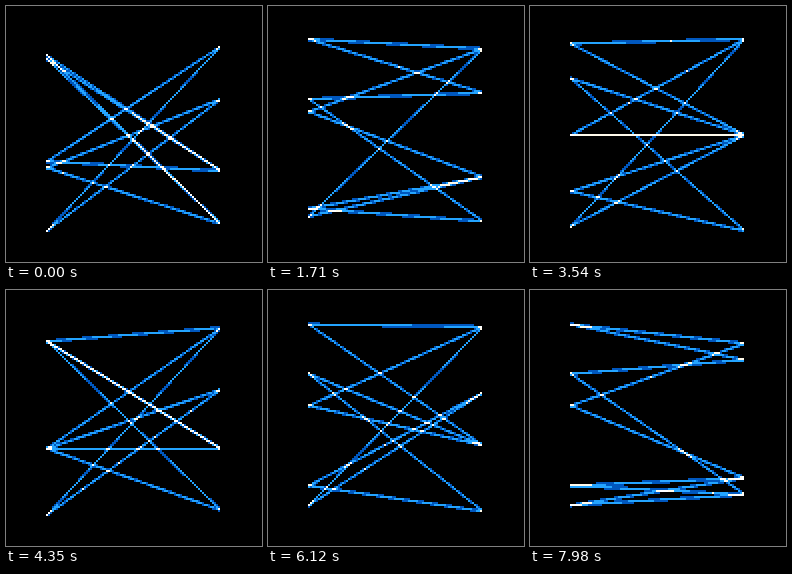
These frames come from a looping animation (256x256 px, 8000 ms). An HTML page with a canvas:

```html
<!DOCTYPE html>
<html lang="en">
<head>
<meta charset="utf-8">
<title>Twisting lines</title>
<style>
  html, body { margin: 0; width: 100%; height: 100%; overflow: hidden; background: #000; }
  canvas { display: block; width: 100%; height: 100%; image-rendering: pixelated; }
</style>
</head>
<body>
<canvas width="128" height="128"></canvas>
<script>
const SIZE = 128, LOOP = 8000, STEP = 30;
const LEFT = 20, WIDTH = 87, CENTER = 64, RADIUS = 48;

// For each corner of the right square: the corners of the left pentagon it is tied to.
const LINKS = [[0, 1], [1, 2, 3], [2, 3, 4], [4, 0]];

// Upper limit of summed light and its colour.
const SHADES = [
  [0.2, [0, 0, 0]],
  [0.6, [0, 87, 190]],
  [0.999, [36, 164, 255]],
  [1.4, [255, 250, 235]],
  [Infinity, [255, 255, 255]]
];

const ctx = document.querySelector('canvas').getContext('2d');
const image = ctx.createImageData(SIZE, SIZE);
const light = new Float32Array(SIZE * SIZE);

const height = degrees => CENTER + RADIUS * Math.cos(degrees * Math.PI / 180);

// In each column, share the light between the two rows around the line.
function line(y0, y1) {
  for (let i = 0; i < WIDTH; i++) {
    const y = y0 + (y1 - y0) * i / WIDTH;
    const row = Math.floor(y), part = y - row;
    const index = row * SIZE + LEFT + i;
    light[index] += 1 - part;
    light[index + SIZE] += part;
  }
}

function draw(step) {
  light.fill(0);
  LINKS.forEach((corners, m) => {
    const right = height(4 * step - 112 + 90 * m);
    for (const k of corners) line(height(2 * step - 2 + 72 * k), right);
  });
  light.forEach((value, i) => {
    const [, rgb] = SHADES.find(([limit]) => value < limit);
    image.data.set([...rgb, 255], i * 4);
  });
  ctx.putImageData(image, 0, 0);
}

const start = performance.now();
function tick() {
  const time = (performance.now() - start) % LOOP;
  draw(Math.floor(time / STEP));
  requestAnimationFrame(tick);
}
tick();
</script>
</body>
</html>
```
